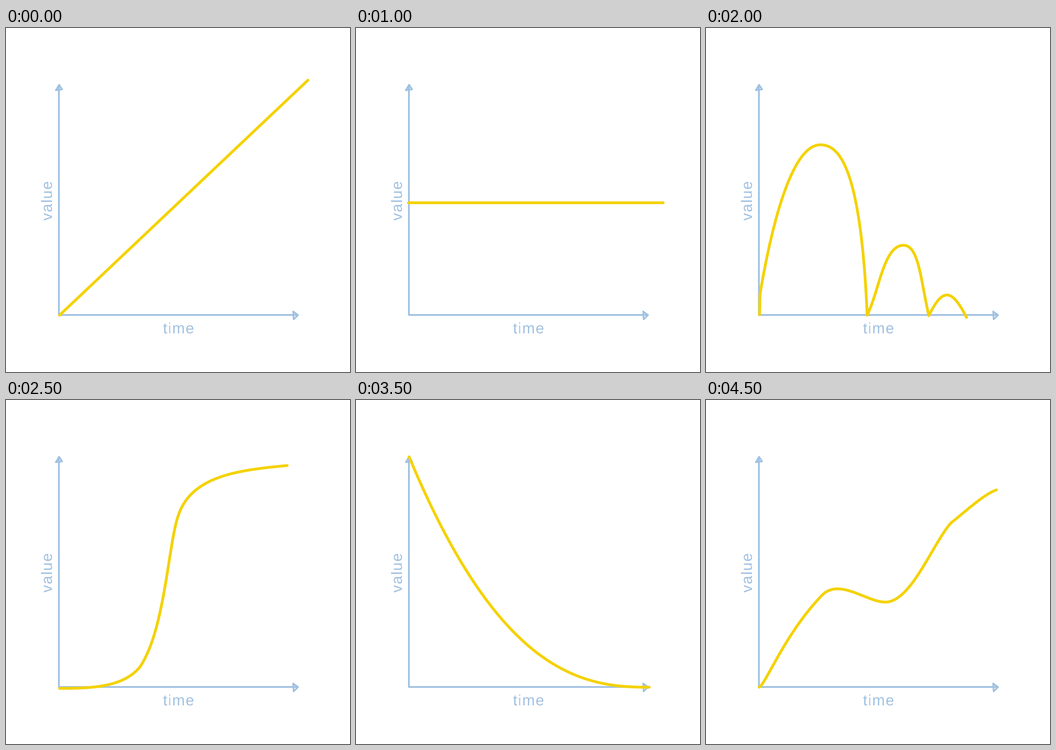
Recreate the animation shown at these times as a matplotlib script. Size 748 by 748 pixels, loop 5000 ms.

```python
import numpy as np
import matplotlib.pyplot as plt
from matplotlib.animation import FuncAnimation
from matplotlib.patches import PathPatch
from matplotlib.textpath import TextPath
from matplotlib.transforms import Affine2D

SIZE, DPI = 748, 100
PX = 72 / DPI
BLUE, YELLOW = "#a0c1e1", "#f4d200"
FONT = {"family": "Liberation Sans"}

# Whole coordinates are pixel centres.
fig = plt.figure(figsize=(SIZE / DPI, SIZE / DPI), dpi=DPI, facecolor="white")
ax = fig.add_axes([0, 0, 1, 1])
ax.set(xlim=(-0.5, SIZE - 0.5), ylim=(SIZE - 0.5, -0.5))
ax.axis("off")


def stroke(points, color, width):
    x, y = np.transpose(points)
    return ax.plot(x, y, color=color, lw=width * PX, solid_capstyle="round",
                   solid_joinstyle="round")[0]


def ink_right(text):
    return TextPath((0, 0), text, size=33, prop=FONT).vertices[:, 0].max()


def label(text, x, y, angle=0, tracking=1.7):
    place = Affine2D().scale(1, -1).rotate_deg(-angle).translate(x, y)
    pen = 0
    for char in text:
        glyph = TextPath((pen, 0), char, size=33, prop=FONT)
        ax.add_patch(PathPatch(place.transform_path(glyph), fc=BLUE, lw=0))
        pen += ink_right(char + "|") - ink_right("|") + tracking


def bezier(*points):
    """Chain of cubic segments; each one starts where the last ended."""
    p = np.array(points, float)
    t = np.linspace(0, 1, 40)[:, None]
    s = 1 - t
    return np.vstack([s**3 * a + 3 * s * s * t * b + 3 * s * t * t * c + t**3 * d
                      for a, b, c, d in zip(p[:-3:3], p[1::3], p[2::3], p[3::3])])


def power(start, end, k=2.5):
    u = np.linspace(0, 1, 120)
    (x0, y0), (x1, y1) = start, end
    return np.c_[x0 + (x1 - x0) * u, y0 + (y1 - y0) * u**k]


linear = [(116, 624), (656, 113)]
ease_in = power((116, 622), (640, 151))
constant = [(114, 380), (668, 380)]
ease_out = power((636, 158), (115, 625))

bounce = np.vstack([
    (116, 623),
    bezier((117, 578), (140, 440), (184, 253.5), (248, 253.5),
           (289, 253.5), (336, 300), (350, 624)),
    bezier((350, 624), (377, 568), (386, 472), (429, 472),
           (462, 472), (466, 545), (484, 625)),
    bezier((484, 625), (513, 566), (533, 563), (566, 629)),
])

sigmoid = bezier((116, 626.5), (200, 627), (256, 620), (290, 581),
                 (346, 500), (352, 310), (375, 248),
                 (405, 164), (505, 152), (611, 142))

steps = [(113, 623.5), (167, 623.5), (167, 553), (400.5, 553),
         (400.5, 418.5), (637, 418.5)]

decay = power((637, 624), (115, 123))

fall = np.vstack([
    (115, 196.5),
    bezier((180, 196.5), (235, 196.5), (315, 238), (357, 270),
           (429, 331), (517, 496), (557, 530),
           (580, 545), (606, 554), (639, 556)),
])

waves = bezier((115, 624), (128, 620), (170, 510), (249, 427),
               (287, 383), (347, 439), (390, 439),
               (446, 438), (492, 312), (532, 267),
               (560, 245), (604, 204), (631, 195))

curves = [linear, ease_in, constant, ease_out, bounce,
          sigmoid, steps, decay, fall, waves]

stroke([(114.3, 124), (114.3, 624), (634, 624)], BLUE, 3.8)
stroke([(108, 134.7), (115, 123), (121.5, 133), (108, 134.7)], BLUE, 3.6)
stroke([(624, 616), (634.5, 623.7), (625, 633), (624, 616)], BLUE, 3.6)
label("time", 341, 663.5)
label("value", 99.4, 418.3, angle=90)
line = stroke(linear, YELLOW, 6)


def draw(i):
    line.set_data(*np.transpose(curves[i]))
    return line,


anim = FuncAnimation(fig, draw, frames=len(curves), interval=500,
                     repeat=True, repeat_delay=0)
plt.show()
```
